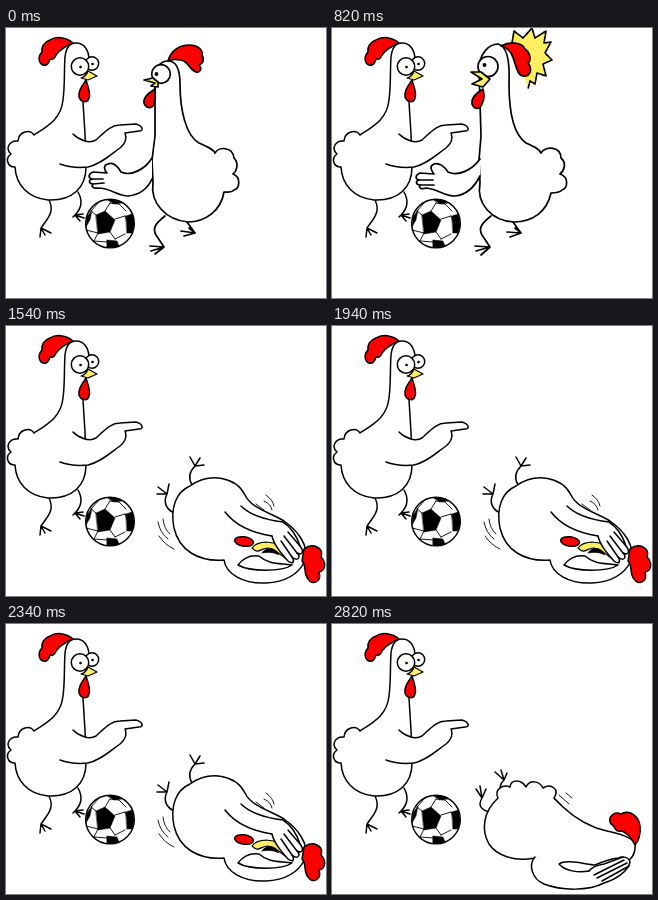
An HTML page for the animation above (2.9 s loop, 320 by 270 pixels).

```html
<!DOCTYPE html>
<html lang="en">
<head>
<meta charset="utf-8">
<title>Chickens playing football</title>
<style>
  html, body { margin: 0; width: 100%; height: 100%; overflow: hidden; background: #fff; }
  svg { display: block; width: 100vw; height: 100vh; }
  path, circle, ellipse { fill: #fff; stroke: #000; stroke-width: 1.5; stroke-linecap: round; stroke-linejoin: round; }
  .bold path, .bold circle { stroke-width: 1.7; }
  path.line { fill: none; }
  path.thin { fill: none; stroke-width: .9; }
  .red { fill: #f00; }
  .yellow { fill: #ffef62; stroke-width: 1.2; }
  .ink { fill: #000; stroke-width: .5; }
  .pose, .lid { display: none; }
  .on { display: inline; }
</style>
</head>
<body>
<svg viewBox="0 0 320 270">
  <defs>
    <!-- arm and hand covering the face -->
    <g id="cover">
      <path d="M203 233C196 241 200 255 212 260C230 267 257 267 272 259C285 255 296 247 298 238C297 233 291 232 286 234C277 235 270 238 263 241C252 240 234 235 227 240C233 247 246 249 257 247"/>
      <path class="line" d="M257 247C260 243 266 241 272 240L291 233M262 251L292 236M265 254L295 239M270 257L297 242"/>
    </g>
  </defs>

  <g id="pointer">
    <path class="line" d="M42 170C47 179 46 185 40 193L35 200M35 200L34 209M35 200L39 207M35 200L45 205M72 164C76 171 77 179 69 187M69 187L67 189M69 187L74 193M69 187L78 190M69 187L77 186"/>
    <path d="M77 74L79 106L80 139C80 160 66 173 42 172C22 170 10 157 9 139C1 139-1 130 5 126C-1 121 3 112 12 113C13 103 24 101 28 107C42 98 55 91 57 72C59 57 58 44 59 29C60 20 64 15 70 15C78 15 83 22 83 32"/>
    <path class="red" d="M67 15C60 9 50 8 44 12C38 14 35 19 36 24C32 28 32 35 37 37C41 38 43 35 44 31C47 32 49 30 50 27C54 21 60 18 67 15Z"/>
    <circle cx="86" cy="35.5" r="6.7"/>
    <circle cx="74" cy="38.5" r="8.7"/>
    <circle class="ink" cx="74.5" cy="39" r="1.1"/>
    <circle class="ink" cx="86.5" cy="36" r="1.1"/>
    <g class="lid"><circle cx="86" cy="35.5" r="6.7"/><circle cx="74" cy="38.5" r="8.7"/><path class="line" d="M66 39H82M83 36H92"/></g>
    <path class="yellow" d="M75 50C79 49 81 46 82 43L91 48L82 52Z"/>
    <path class="red" d="M80 52C76 58 72 63 73 69C75 75 82 75 83 70C85 65 82 59 80 52Z"/>
    <path d="M67 106C73 112 83 116 90 112C98 105 104 97 114 97L130 96C137 98 138 103 133 103L119 105C121 110 120 115 114 120C104 127 95 136 82 139C72 140 62 139 54 136" />
  </g>

  <g id="ball">
    <circle cx="104" cy="195.5" r="24.3"/>
    <path class="thin" d="M90 187L85 183M99 183L104 175M109 191L119 188M104 204L109 211M92 205L88 213M85 183L93 174M104 175L113 176L120 183M119 188L124 201M109 211L119 206M88 213L101 214M80 202L92 205"/>
    <path class="ink" d="M90 187L99 183L109 192L104 204L92 206ZM102 172Q110 171 116 175L108 176ZM81 189L86 182L84 192L80 199ZM101 212L111 213L113 218Q106 221 101 219ZM120 188L126 186Q130 196 126 205L121 205Z"/>
  </g>

  <g id="stand" class="pose bold on">
    <path class="line" d="M159 188C150 195 146 200 150 207L158 219M158 219L144 218M158 219L145 223M158 219L149 226M181 194L189 205M189 205L175 203M189 205L178 208M189 205L183 200"/>
    <path d="M149 52C147 40 155 33 162 33C171 33 174 43 174 56C174 82 180 108 193 115C202 119 207 121 209 125C213 118 227 119 228 130C233 135 231 143 227 146C235 149 234 160 228 162C225 165 221 164 218 164C215 183 199 194 182 194C160 192 144 175 147 155L146 132L149 108Z"/>
    <path class="red" d="M162 33C165 22 174 17 183 17C192 17 197 22 196 27C199 33 196 36 193 37C197 42 193 46 188 43C183 40 181 32 174 32C170 31 166 31 162 33Z"/>
    <circle cx="155" cy="46" r="9.3"/>
    <circle class="ink" cx="150.5" cy="46" r="1.1"/>
    <g class="lid"><circle cx="155" cy="46" r="9.3"/><path class="line" d="M146 47H164"/></g>
    <path class="yellow" d="M138 52L147 50L152 54V59L145 58L149 55Z"/>
    <path class="red" d="M149 61C143 65 137 69 138 75C140 81 146 81 148 76C150 70 149 66 149 61Z"/>
    <path d="M146 130C140 140 126 149 115 144C112 139 107 134 102 136C97 137 98 142 101 145L87 144C82 146 82 150 86 151C82 152 83 156 87 156C85 158 87 161 92 160C105 160 111 168 122 168C132 167 141 162 146 151"/>
    <path class="line" d="M86 151L97 151M87 156L98 155"/>
  </g>

  <g id="hit" class="pose bold">
    <g id="star">
      <path class="yellow" style="stroke-dasharray:4 1.5" d="M180 15L182 3L191 10L200 0L203 10L214 3L212 15L219 14L213 25L220 32L211 36L214 48L205 45L203 56L198 53L196 61"/>
    </g>
    <path class="line" d="M159 188C150 195 146 200 150 207L158 219M158 219L143 218M158 219L144 223M158 219L149 227M181 194L189 205M189 205L175 204M189 205L178 209M189 205L183 200"/>
    <path d="M147 40C148 25 157 16 166 16C175 18 178 34 177 56C177 84 181 106 194 115C203 119 207 121 209 125C214 117 229 119 229 130C235 135 232 143 228 146C237 149 236 160 230 162C227 165 222 165 219 165C215 184 200 194 182 194C160 193 144 176 148 155L147 132L149 108Z"/>
    <path class="red" d="M169 18C178 13 190 14 193 21C199 25 199 33 196 35C201 41 198 49 191 48C184 47 184 34 179 25C176 21 173 19 169 18Z"/>
    <circle cx="156" cy="38.5" r="10"/>
    <circle class="ink" cx="152.5" cy="37" r="1.1"/>
    <path class="yellow" d="M139 44L149 44L158 51L151 59L140 56L150 51Z"/>
    <path class="red" d="M151 61C144 65 139 70 140 76C142 82 148 82 150 76C153 70 152 66 151 61Z"/>
    <path d="M148 131C141 141 127 149 116 144C113 139 107 134 102 136C97 138 99 142 102 146L88 145C83 147 83 151 87 152C83 153 84 157 88 157C86 159 89 162 94 160C106 161 112 168 123 168C133 167 142 160 148 148"/>
    <path class="line" d="M87 152L101 152M88 157L102 157"/>
  </g>

  <g id="down" class="pose">
    <path class="line" d="M160 178C146 173 144 160 149 147M149 147L139 142M149 147L143 136M149 147L152 139M185 150C193 145 194 137 190 127M190 127L180 125M190 127L184 119M190 127L193 115"/>
    <path d="M199 147C183 146 167 155 161 174C154 194 160 218 175 226C184 231 194 234 203 233C222 240 265 249 294 238C300 234 303 227 301 219C285 215 273 211 262 203C247 192 237 174 235 151"/>
    <path d="M199 147C197 139 207 135 211 140C214 130 226 130 227 139C236 136 241 145 238 151C236 153 232 152 229 149"/>
    <path class="red" d="M284 190C281 181 289 176 295 179C300 173 310 178 311 190C312 205 308 220 301 225C302 215 298 206 295 203C288 202 291 196 284 190Z"/>
    <use href="#cover"/>
  </g>

  <g id="roll" class="pose">
    <path class="line" d="M157 188C148 185 146 181 150 174M150 174L144 165M150 174L148 162M150 174L154 165M169 167C167 163 168 160 172 156M172 156L163 148M172 156L169 146M172 156L175 149"/>
    <path d="M166 174C151 188 149 206 157 220C165 232 183 238 203 234C224 242 268 248 294 238C300 235 304 228 303 218C291 208 276 209 262 203C244 196 232 185 222 174C228 165 219 159 211 164C207 156 197 156 194 163C189 155 179 155 178 163C170 160 162 166 166 174Z"/>
    <path class="red" d="M279 200C275 193 282 187 289 190C297 185 307 192 308 202C309 211 306 218 303 221C299 213 295 209 290 207C282 209 284 202 279 200Z"/>
    <use href="#cover"/>
    <path class="thin" d="M222 175L230 182M227 171L237 180M234 169L240 174"/>
  </g>

  <g id="up" class="pose">
    <path class="line" d="M169 187C160 184 157 176 161 168M161 168L151 168M161 168L152 161M161 168L163 158M186 159C182 152 183 146 189 140M189 140L184 131M189 140L194 132M189 140L198 139"/>
    <path d="M184 160C170 166 164 182 168 202C173 224 192 236 218 234C220 248 237 258 260 257C281 256 293 247 299 235C304 220 291 204 278 195C263 186 245 182 239 169C230 151 204 146 184 160Z"/>
    <path class="red" d="M298 223C307 216 318 222 315 231C321 237 319 245 313 246C316 256 306 260 302 253C297 247 301 240 296 235Z"/>
    <path d="M232 239C238 231 246 229 253 230C263 239 274 237 286 239C276 246 244 246 232 239Z"/>
    <ellipse class="red" cx="238" cy="215.5" rx="9.5" ry="4.7" transform="rotate(8 238 215.5)"/>
    <path class="yellow" d="M246 222C252 214 270 214 282 224L287 237C276 232 273 224 262 222C254 222 253 229 246 222Z"/>
    <path class="ink" d="M256 227C260 220 270 221 273 229C267 226 262 226 256 227Z"/>
    <path class="line" d="M219 186C229 199 247 207 266 210M235 180C245 190 261 194 277 196"/>
    <path d="M266 210C268 219 275 227 282 235C287 239 289 235 286 231C292 236 295 231 291 227C297 230 298 225 294 220C291 211 285 201 277 196"/>
    <path class="line" d="M275 215L286 231M278 210L291 227M282 206L294 220"/>
    <path class="thin" d="M152 196Q154 207 162 213M157 193Q158 203 164 208M153 210Q159 219 168 223M250 178L258 184M258 175Q265 178 266 184M260 169Q267 174 268 180"/>
  </g>
</svg>
<script>
  const LOOP = 2900, STEP = 80, HIT = 820, LAND = 1140;
  const poses = [...document.querySelectorAll('.pose')];
  const lids = [...document.querySelectorAll('.lid')];
  const star = document.getElementById('star');
  const roll = ['up', 'roll', 'down', 'roll', 'up'];
  const start = performance.now();

  function show(id, move = '') {
    for (const p of poses) {
      p.classList.toggle('on', p.id === id);
      if (p.id === id) p.setAttribute('transform', move);
    }
  }

  function draw() {
    const t = (performance.now() - start) % LOOP;
    const blink = t >= 240 && t < 340;
    lids.forEach(l => l.classList.toggle('on', blink));
    if (t < HIT) {
      show('stand');
    } else if (t < LAND) {
      const k = Math.floor((t - HIT) / STEP);
      star.style.display = k ? 'none' : 'inline';
      show('hit', `translate(${-3 * k} ${4 * k * k}) rotate(${30 * k} 185 150)`);
    } else {
      const n = Math.floor((t - LAND) / STEP), k = n % 5;
      show(n ? roll[k] : 'down', k > 2 ? 'translate(-2 -1)' : '');
    }
    requestAnimationFrame(draw);
  }
  draw();
</script>
</body>
</html>
```
